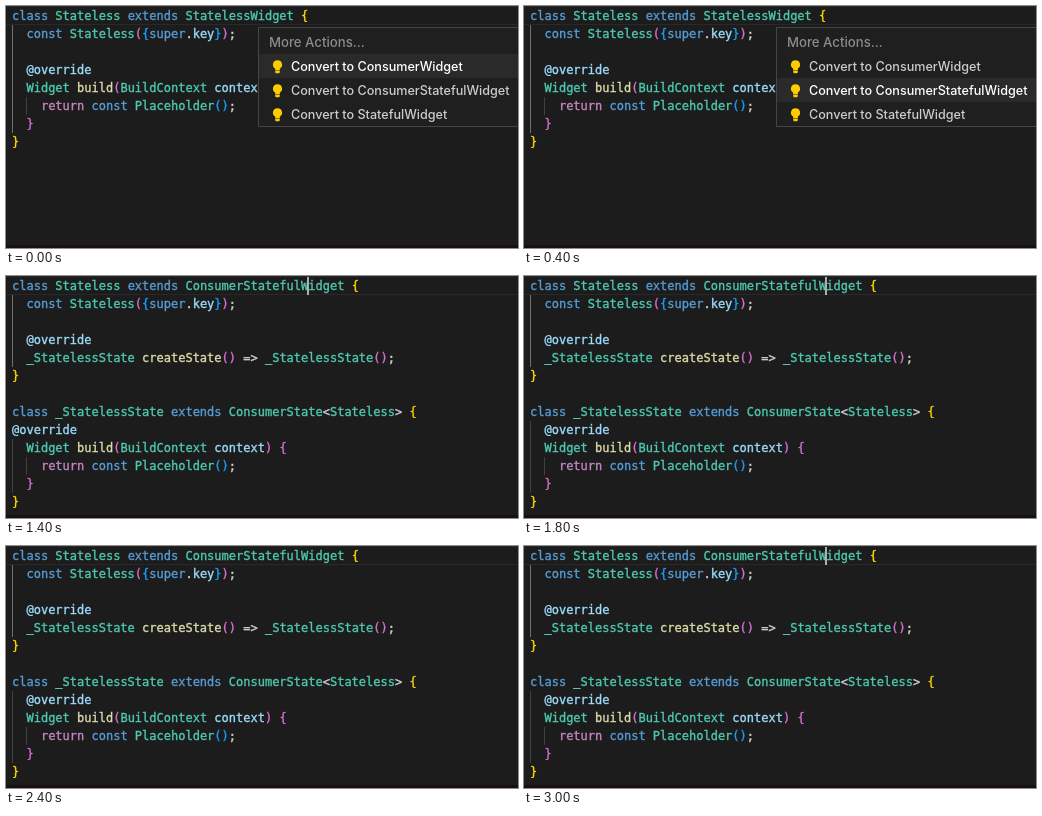
An HTML page for the animation above (3.1 s loop, 512 px wide and 242 px high).

```html
<!DOCTYPE html>
<html lang="en">
<head>
<meta charset="utf-8">
<style>
html, body { margin: 0; width: 100%; height: 100%; overflow: hidden; background: #1c1c1c; }
#stage { position: absolute; left: 0; top: 0; width: 512px; height: 242px; overflow: hidden; }
#stage div, pre { position: absolute; box-sizing: border-box; }
pre { left: 6px; top: 1px; margin: 0; color: #d4d4d4; font: 12px/18px "DejaVu Sans Mono", monospace;
  -webkit-text-stroke: .35px; }
.line { left: 0; top: 0; width: 512px; height: 19px; border: solid #292929; border-width: 1px 0; }
.bottom { left: 0; top: 239px; width: 512px; height: 3px; background: #180e15; }
.guide { width: 1px; background: #404040; }
.active { background: #707070; }
#caret { left: 301px; top: 1px; width: 2px; height: 18px; background: #aeafad; }
#menu { left: 252px; top: 21px; width: 270px; height: 100px; background: #1f1f1f; border: 1px solid #454545;
  color: #ccc; font: 500 12.6px/24px Inter, sans-serif; white-space: nowrap; }
#menu .title { left: 10px; top: 2px; font-size: 13.2px; color: #8c8c8c; }
#menu .item { left: 0; width: 270px; height: 24px; padding: 1px 0 0 32px; }
#menu .on { background: #2a2a2a; color: #fff; }
#menu svg { position: absolute; left: 13px; top: 6px; }
</style>
</head>
<body>
<div id="stage">
  <div class="line"></div>
  <div class="bottom"></div>
  <div id="guides"></div>
  <pre id="code"></pre>
  <div id="caret"></div>
  <div id="menu"><div class="title">More Actions...</div></div>
</div>
<script>
const $ = id => document.getElementById(id);
const LOOP = 3100;

const BEFORE = `class Stateless extends StatelessWidget {
  const Stateless({super.key});

  @override
  Widget build(BuildContext context) {
    return const Placeholder();
  }
}`;
const RAW = `class Stateless extends ConsumerStatefulWidget {
  const Stateless({super.key});

  @override
  _StatelessState createState() => _StatelessState();
}

class _StatelessState extends ConsumerState<Stateless> {
@override
  Widget build(BuildContext context) {
    return const Placeholder();
  }
}`;
const TIDY = RAW.replace("\n@override", "\n  @override");

const WORDS = [
  [/^(class|extends|const|super)$/, "#569cd6"],
  [/^return$/, "#c586c0"],
  [/^(build|createState)$/, "#dcdcaa"],
  [/^(@override|key|context)$/, "#9cdcfe"],
  [/^_?[A-Z]/, "#4ec9b0"]
];
const BRACKETS = ["#ffd700", "#da70d6", "#179fff"];

function highlight(text) {
  let depth = 0;
  return text.replace(/@?\w+|[(){}<>]/g, s => {
    let color;
    if ("({".includes(s)) color = BRACKETS[depth++ % 3];
    else if (")}".includes(s)) color = BRACKETS[--depth % 3];
    else color = (WORDS.find(([re]) => re.test(s)) || [])[1] || "#d4d4d4";
    return `<span style="color:${color}">${s.replace("<", "&lt;").replace(">", "&gt;")}</span>`;
  });
}

// Indent guide at a column, covering rows from..to (exclusive)
const guide = (col, from, to, active = "") =>
  `<div class="guide ${active}" style="left:${6 + col * 7.224 | 0}px;top:${1 + from * 18}px;height:${(to - from) * 18}px"></div>`;

const scenes = [
  [BEFORE, guide(0, 1, 7, "active") + guide(2, 5, 6)],
  [RAW, guide(0, 1, 5, "active") + guide(0, 9, 12) + guide(2, 10, 11)],
  [TIDY, guide(0, 1, 5, "active") + guide(0, 8, 12) + guide(2, 10, 11)]
].map(([text, guides]) => [highlight(text), guides]);

const bulb = `<svg width="11" height="14" viewBox="0 0 11 14" fill="#ffcc00">
  <path d="M5.5 .3a4.5 4.5 0 0 1 2.3 8.4V10H3.2V8.7A4.5 4.5 0 0 1 5.5 .3ZM3.2 10.5h4.6V12q0 1.3-1.2 1.3H4.4Q3.2 13.3 3.2 12Z"/></svg>`;
const items = ["Consumer", "ConsumerStateful", "Stateful"].map((kind, i) => {
  const item = document.createElement("div");
  item.style.top = 26 + i * 24 + "px";
  item.innerHTML = `${bulb}Convert to ${kind}Widget`;
  $("menu").append(item);
  return item;
});

let shown = -1;
function draw(t) {
  const scene = t < 1000 ? 0 : t < 1600 ? 1 : 2;
  if (scene !== shown) {
    [$("code").innerHTML, $("guides").innerHTML] = scenes[scene];
    shown = scene;
  }
  const picked = t < 100 ? 0 : 1;
  items.forEach((item, i) => item.className = i === picked ? "item on" : "item");
  $("menu").hidden = scene > 0;
  $("caret").hidden = scene === 0 || (t >= 2300 && t < 2900);
}

const start = performance.now();
function tick() {
  draw((performance.now() - start) % LOOP);
  requestAnimationFrame(tick);
}
tick();
</script>
</body>
</html>
```
